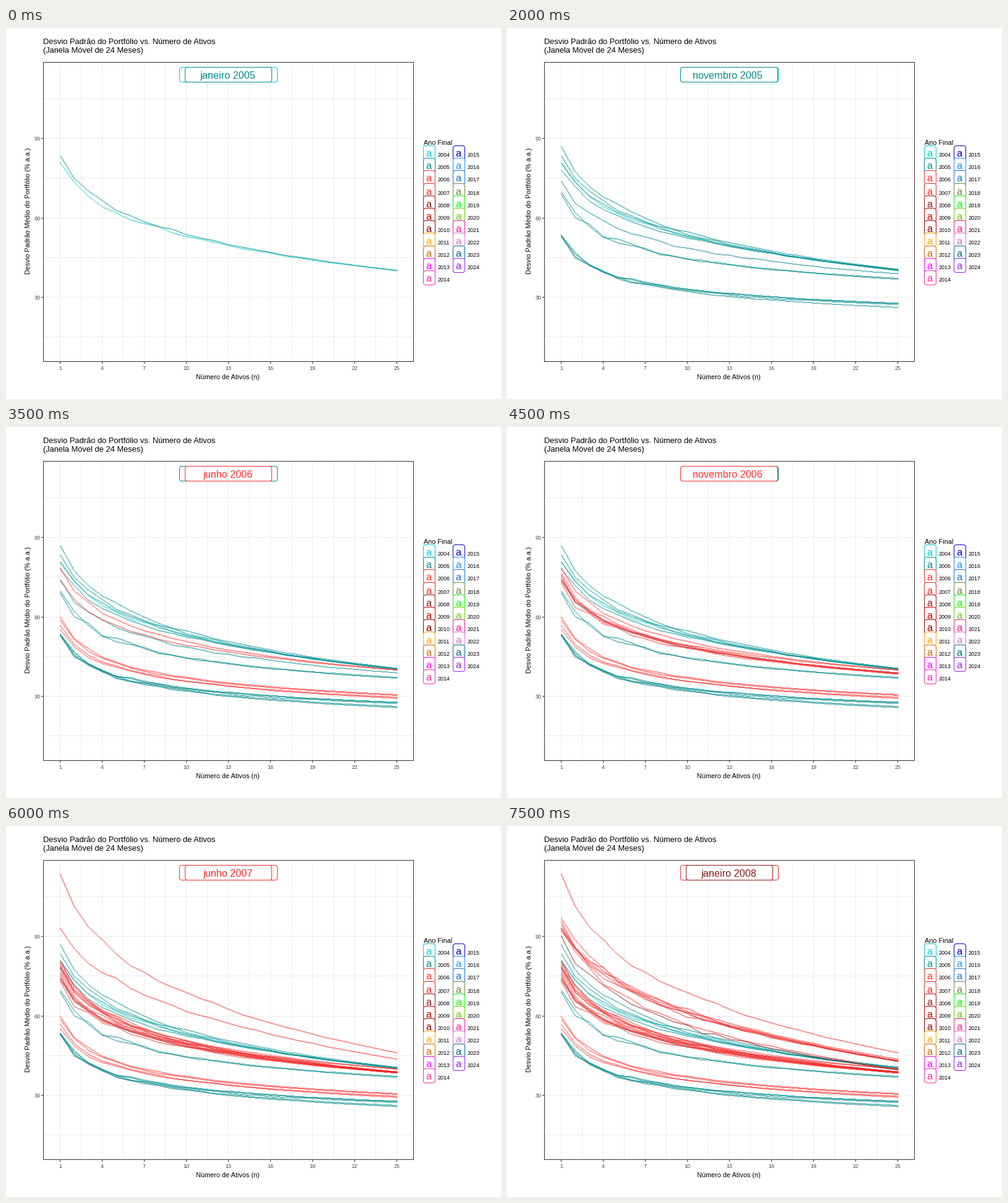
Animation, 800 px wide and 600 px high, one loop 8 s. Source, as a matplotlib script:

```python
import numpy as np
import matplotlib.pyplot as plt
from matplotlib.animation import FuncAnimation
from matplotlib.patches import FancyBboxPatch, Rectangle

plt.rcParams["font.family"] = "Liberation Sans"

FRAMES, INTERVAL = 16, 500
MONTHS = ["janeiro", "fevereiro", "março", "abril", "maio", "junho", "julho",
          "agosto", "setembro", "outubro", "novembro", "dezembro"]
COLORS = dict(zip(range(2004, 2025), [
    "#00CED1", "#008B8B", "#FF3030", "#EE2C2C", "#8B1A1A", "#CD0000",
    "#8B0000", "#FFA500", "#CD6600", "#FF00FF", "#EE30A7", "#0000CD",
    "#1E90FF", "#1874CD", "#6E8B3D", "#00FF00", "#66CD00", "#FF1493",
    "#DA70D6", "#00688B", "#A020F0"]))

rng = np.random.default_rng(7)
n = np.arange(1, 26)

fig = plt.figure(figsize=(8, 6), dpi=100, facecolor="white")
PX = 72 / fig.dpi
ax = fig.add_axes([0, 0, 1, 1])
ax.set_xlim(0, 800)
ax.set_ylim(600, 0)
ax.axis("off")


def sx(assets):
    return 87.5 + (assets - 1) * 68 / 3


def sy(value):
    return 564 - 4.283 * value


def text(x, y, s, size, color="black", **kw):
    return ax.text(x, y, s, fontsize=size * PX, color=color, **kw)


def bar(x, y, w, h, color, z=1):
    ax.add_patch(Rectangle((x, y), w, h, fc=color, lw=0, zorder=z))


def box(x0, y0, x1, y1, color, z):
    patch = FancyBboxPatch((x0, y0), x1 - x0, y1 - y0,
                           boxstyle="round,pad=0,rounding_size=4",
                           fc="white", ec=color, lw=PX, zorder=z)
    return ax.add_patch(patch)


def pixel_line(values, color):
    """A crisp line, one pixel thick, stepping on whole pixels."""
    cols = np.arange(87, 633)
    top = np.floor(np.interp(cols + .5, sx(n), sy(values)))
    bottom = np.maximum(top + 1, np.append(top[1:], top[-1]))
    return ax.fill_between(cols, top, bottom, step="post", color=color,
                           lw=0, snap=False, zorder=3)


def cluster(count, first, last, end, p=.02, rough=.015):
    """Curves that fall like n ** -p, with starts spread from first to last."""
    base = 25.0 ** -p
    shape = (n ** -p - base) / (1 - base)
    curves = []
    for start in np.linspace(first, last, count):
        wobble = 1 + rough * rng.normal(size=25)
        wobble[0] = 1
        low = end + rng.uniform(-.3, .3)
        curves.append(low + (start - low) * shape * wobble)
    return curves


def build_curves():
    """One curve per month, from December 2004 to January 2008."""
    return (cluster(1, 80.8, 80.8, 40.3, -.1, .03)
            + cluster(3, 83.5, 78, 40.4, -.1, .02)
            + cluster(1, 74, 74, 38.7, rough=.04)
            + cluster(2, 69.8, 69, 37, .15, .04)
            + cluster(1, 87, 87, 40.7, -.05, .02)
            + cluster(1, 53.4, 53.4, 26.2, .2, .03)
            + cluster(3, 53, 53.5, 27.6, .25, .03)
            + cluster(1, 53.2, 53.2, 25.9, .2, .03)
            + cluster(1, 58.8, 58.8, 30.7, .2)
            + cluster(2, 55.2, 56.8, 29.6, .15)
            + cluster(1, 59.8, 59.8, 30.7, .2)
            + cluster(2, 78.5, 74, 39.9)
            + cluster(10, 73, 81, 38.7, rough=.025)
            + cluster(1, 93, 93, 44, -.25)
            + cluster(1, 113.5, 113.5, 46, -.15)
            + cluster(5, 97, 92, 43, -.2, .025)
            + cluster(2, 92.8, 90.2, 39.9, -.12, .03))


def draw_panel():
    for x in np.floor(sx(np.arange(1, 26, 1.5))):
        bar(x, 55, 1, 484, "#EBEBEB")
    for y in np.floor(sy(np.arange(15, 106, 15))):
        bar(60, y, 598, 1, "#EBEBEB")
    for x in (60, 658):
        bar(x, 55, 1, 485, "#333333", 6)
    for y in (55, 539):
        bar(60, y, 599, 1, "#333333", 6)
    for a in range(1, 26, 3):
        x = np.floor(sx(a))
        bar(x, 540, 1, 3, "#333333")
        text(x + .5, 553, a, 9, "#4D4D4D", ha="center")
    for v in (30, 60, 90):
        y = np.floor(sy(v))
        bar(57, y, 3, 1, "#333333")
        text(55.5, y + 4, v, 9, "#4D4D4D", ha="right")
    text(60, 26, "Desvio Padrão do Portfólio vs. Número de Ativos", 12.85)
    text(60, 40, "(Janela Móvel de 24 Meses)", 12.85)
    text(358.5, 568, "Número de Ativos (n)", 10.9, ha="center")
    text(41, 296, "Desvio Padrão Médio do Portfólio (% a.a.)", 10.9,
         rotation=90, ha="right", va="center")


def draw_legend():
    text(675, 189, "Ano Final", 10.9)
    for i, (year, color) in enumerate(COLORS.items()):
        col, row = divmod(i, 11)
        x, y = 674.5 + 48 * col, np.floor(190.5 + 20.2 * row) + .5
        z = 10 + .1 * i
        box(x, y, x + 19, y + 23, color, z)
        text(x + 8.5, y + 18, "a", 16.3, color, ha="center", zorder=z + .05)
        text(x + 23, y + 18, year, 9)


def year_of(month):
    return 2005 + month // 12


draw_panel()
draw_legend()
lines = [pixel_line(c, COLORS[year_of(i - 1)])
         for i, c in enumerate(build_curves())]
outer = box(280.5, 63.5, 438.5, 87.5, "black", 7)
inner = box(289.5, 63.5, 429.5, 87.5, "black", 8)
label = text(358.5, 82, "", 16.3, ha="center", zorder=9)


def update(k):
    month = round(k * 36 / 15)
    year = year_of(month)
    name = MONTHS[month % 12]
    for i, line in enumerate(lines):
        line.set_visible(i <= month + 1)
    wide = name == "novembro"
    x0, x1 = (280.5, 437.5) if wide else (289.5, 429.5)
    inner.set_bounds(x0, 63.5, x1 - x0, 24)
    inner.set_edgecolor(COLORS[year])
    outer.set_edgecolor(COLORS[year - 1])
    label.set_text(f"{name} {year}")
    label.set_x(356 if wide else 358.5)
    label.set_color(COLORS[year])
    return [*lines, outer, inner, label]


anim = FuncAnimation(fig, update, frames=FRAMES, interval=INTERVAL,
                     repeat=True, repeat_delay=0, blit=False)
plt.show()
```
